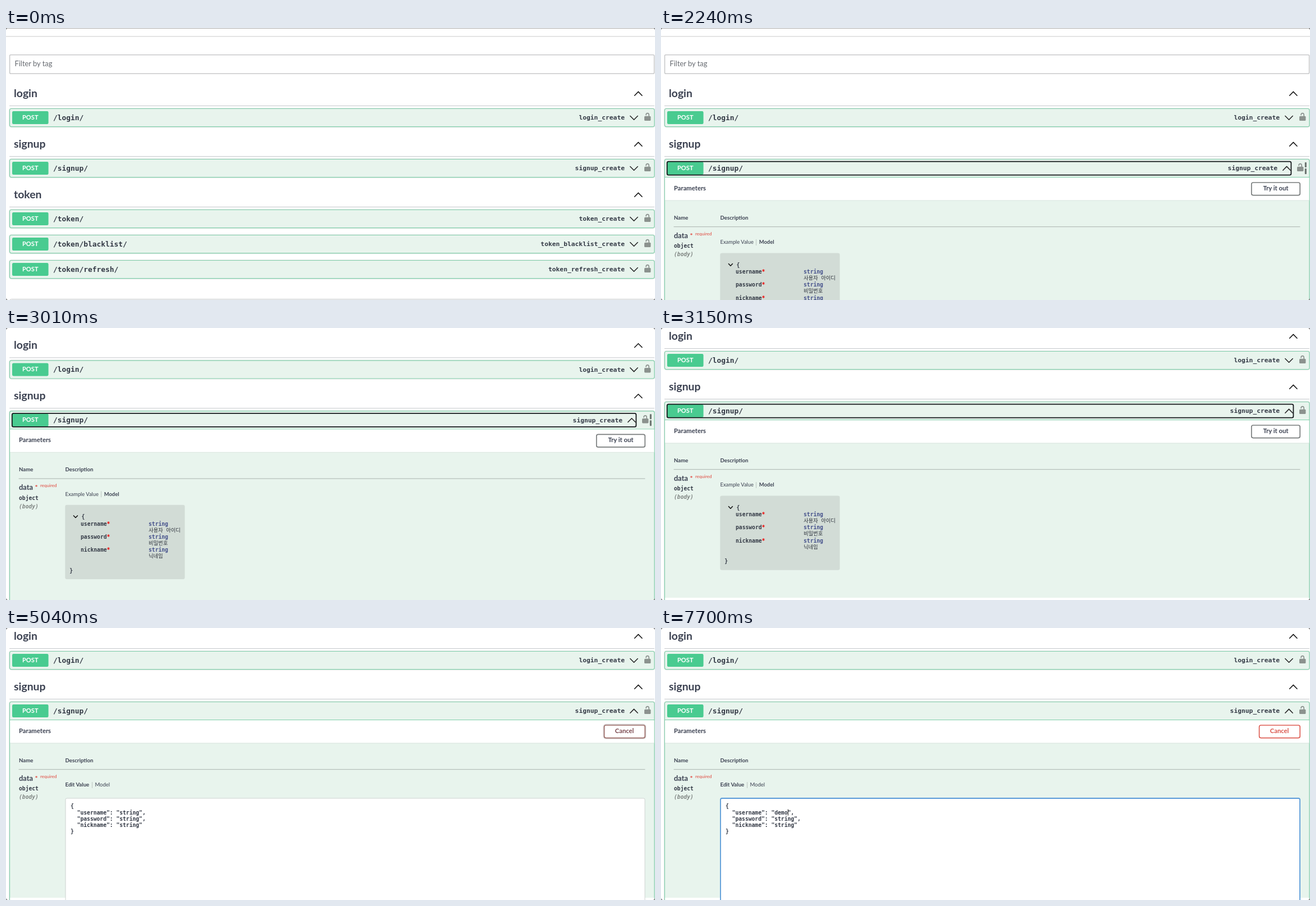
An HTML page that plays this animation: 1156 px wide and 484 px high, repeating every 8 s.

```html
<!DOCTYPE html>
<html lang="en">
<head>
<meta charset="utf-8">
<title>API console</title>
<style>
  html, body { margin: 0; width: 100%; height: 100%; overflow: hidden; background: #fff; }
  svg { display: block; width: 1156px; height: 484px; }
  text { font-family: Lato, sans-serif; fill: #3b4151; white-space: pre; }
  .b { font-weight: 700; }
  .m { font-family: "DejaVu Sans Mono", monospace; font-weight: 700; fill: #333945; }
  .k { font-family: "DejaVu Sans Mono", "Noto Sans CJK KR", "Noto Sans CJK JP", monospace; fill: #2c313b; }
  .red { fill: #e0483e; }
</style>
</head>
<body>
<svg id="stage" viewBox="0 0 1156 484"></svg>
<script>
const LOOP = 8000, STEP = 70, SCROLL = 102, BODY = 640;
const CHAR = 5.821, EDIT_X = 115, WORD_COL = 15;
const GREEN = '#49cb90', TINT = '#e8f4ed', EDGE = '#82cfac';
const stage = document.getElementById('stage');

function el(parent, tag, attrs = {}) {
  const node = document.createElementNS('http://www.w3.org/2000/svg', tag);
  for (const k in attrs) node.setAttribute(k, attrs[k]);
  return parent.appendChild(node);
}
const group = (p, attrs) => el(p, 'g', attrs);
const rect = (p, x, y, width, height, attrs) => el(p, 'rect', { x, y, width, height, ...attrs });
const line = (p, d, stroke, w = 1) =>
  el(p, 'path', { d, stroke, 'stroke-width': w, fill: 'none', 'stroke-linecap': 'round', 'stroke-linejoin': 'round' });
function text(p, x, y, size, str, cls = '', attrs = {}) {
  const node = el(p, 'text', { x, y, 'font-size': size, class: cls, ...attrs });
  node.textContent = str;
  return node;
}
const show = (node, on) => node.setAttribute('display', on ? 'inline' : 'none');
const shift = (node, x, y) => node.setAttribute('transform', `translate(${x} ${y})`);
const clamp = u => Math.max(0, Math.min(1, u));
const phase = (t, from, to) => clamp((t - from) / (to - from));

const chevron = (x, y, dy) => `M${x} ${y}l6.7 ${dy}l6.7 ${-dy}`;

function tag(p, base, name) {
  text(p, 14, base, 19.4, name, 'b');
  line(p, chevron(1119.6, base - 2.8, -6.8), '#111', 1.5);
  line(p, `M6.5 ${base + 15.5}H1154.5`, '#c6c8cc');
}

function lock(p, x, y) {
  rect(p, x, y + 5.8, 11.4, 8.4, { rx: 1.6, fill: '#8b928e' });
  line(p, `M${x + 8.2} ${y + 6}v-2.3c0-4-5-4-5.2 0`, '#8b928e', 1.6);
}

// One operation row; returns the parts that change later.
function operation(p, y, path, id) {
  const box = { rx: 3.2, fill: 'none' };
  const halo = rect(p, 6.5, y, 1148.5, 32.2, { ...box, stroke: 'rgba(0,0,0,.08)', 'stroke-width': 3.2 });
  const frame = rect(p, 6.5, y, 1148.5, 32.2, { ...box, fill: TINT, stroke: EDGE, 'stroke-width': 1.2 });
  rect(p, 11, y + 4.6, 64.6, 23, { rx: 2.4, fill: GREEN });
  text(p, 43.3, y + 19.2, 11.1, 'POST', 'b', { 'text-anchor': 'middle', style: 'fill:#fff' });
  text(p, 84, y + 20.3, 12.88, path, 'm');
  const tail = group(p);
  text(tail, 1102, y + 19.8, 11.3, id, 'm', { 'text-anchor': 'end' });
  const arrow = line(tail, chevron(1111.8, y + 13, 6.8), '#222', 1.5);
  lock(tail, 1137, y + 7.4);
  return { halo, frame, tail, arrow };
}

const page = group(stage);
rect(page, 0.5, -40, 1155, 40.4, { rx: 3, fill: '#fff', stroke: '#a3a3a3' });
rect(page, 0, 14, 1156, 2, { fill: '#e4e4e4' });
rect(page, 6.6, 47.8, 1148, 33.4, { rx: 2, fill: '#fff', stroke: '#c9cacb', 'stroke-width': 1.6 });
text(page, 15.5, 67.6, 12.9, 'Filter by tag', '', { style: 'fill:#666a70' });

tag(page, 123, 'login');
operation(page, 143.5, '/login/', 'login_create');
tag(page, 213, 'signup');

const below = group(page);
tag(below, 303, 'token');
operation(below, 323.5, '/token/', 'token_create');
operation(below, 368.5, '/token/blacklist/', 'token_blacklist_create');
operation(below, 413.5, '/token/refresh/', 'token_refresh_create');
rect(below, 6.5, 482.6, 1148.5, 60, { rx: 3, fill: '#fff', stroke: '#c2c4c7' });

const signup = operation(page, 233.5, '/signup/', 'signup_create');
const bars = group(page);
rect(bars, 1146.8, 239, 3, 9, { rx: 0.8, fill: '#68706c' });
rect(bars, 1146.8, 250, 3, 10, { rx: 0.8, fill: '#68706c' });
const outline = rect(page, 10.8, 237.6, 1112, 24, { rx: 2.6, fill: 'none', stroke: '#14181b', 'stroke-width': 1.8 });

const clip = el(el(stage, 'defs'), 'clipPath', { id: 'fold' });
const fold = rect(clip, 0, 265, 1156, 0);
const body = group(page, { 'clip-path': 'url(#fold)' });
line(body, 'M7 265.5H1154.5', EDGE, 1.2);
rect(body, 7.2, 266.2, 1147.2, 40.3, { fill: '#fff' });
line(body, 'M7.5 307H1154', '#dce6e0');
text(body, 23, 289, 11.28, 'Parameters', 'b');
text(body, 23, 340.6, 9.67, 'Name', 'b');
text(body, 105.5, 340.6, 9.67, 'Description', 'b');
line(body, 'M23 353.7H1138', '#a9b3ae');
text(body, 23, 373.6, 12.9, 'data', 'b');
text(body, 51.6, 374, 12, '*', 'b red');
text(body, 61, 369, 8.1, 'required', 'red');
text(body, 23, 391.2, 9.67, 'object', 'm');
text(body, 23, 406.4, 9.67, '(body)', 'm', { style: 'font-style:italic;fill:#808683' });
rect(body, 7.2, 582, 1147.2, 40, { fill: '#fff' });

const glow = rect(body, 1051.4, 274.8, 87, 22.8, { rx: 3.4, fill: 'none', stroke: 'rgba(0,0,0,.16)', 'stroke-width': 4.4 });
const button = rect(body, 1051.8, 275, 86.4, 22.6, { rx: 3, fill: '#fff', 'stroke-width': 1.7 });
const label = text(body, 1095, 289, 11.28, '', 'b', { 'text-anchor': 'middle' });

// Read-only model
const model = group(body);
text(model, 105.5, 384.2, 9.35, 'Example Value');
line(model, 'M169.5 376.5V386.5', '#bcc5c0');
text(model, 174.8, 384.2, 9.35, 'Model', 'b');
rect(model, 105.3, 400.5, 213.2, 132.2, { rx: 3.2, fill: '#d2dcd6' });
line(model, 'M120.4 419.6l3.5 3.6l3.5 -3.6', '#111', 1.5);
text(model, 134.5, 424.6, 9.67, '{', 'm');
[['username', '사용자 아이디'], ['password', '비밀번호'], ['nickname', '닉네임']].forEach(([key, note], i) => {
  const y = 437.3 + i * 23.1;
  text(model, 133, y, 9.67, key, 'm');
  text(model, 133 + 8 * CHAR, y, 9.67, '*', 'm', { style: 'fill:#e00' });
  text(model, 254, y, 9.67, 'string', 'm', { style: 'fill:#46528c' });
  text(model, 254, y + 11, 9.3, note, 'k');
});
text(model, 113.3, 520.4, 9.67, '}', 'm');

// Editable value
const editor = group(body);
text(editor, 105.5, 384.2, 9.67, 'Edit Value', 'b');
line(editor, 'M153.5 376.5V386.5', '#bcc5c0');
text(editor, 158.4, 384.2, 9.5, 'Model');
const area = rect(editor, 106, 405, 1032, 260, { rx: 2.6, fill: '#fff' });
const select = rect(editor, EDIT_X + WORD_COL * CHAR, 424.3, 6 * CHAR, 11.4, { fill: '#b4d5fe' });
const rows = ['{', '', '  "password": "string",', '  "nickname": "string"', '}'].map((s, i) =>
  text(editor, EDIT_X, 422.4 + i * 11.27, 9.67, s, 'm'));
const caret = rect(editor, 0, 424.6, 1, 11, { fill: '#111' });

// Window corners stay put while the page scrolls.
el(stage, 'path', { d: 'M0 0h3l-3 3zM1156 0v3l-3 -3zM0 484v-3l3 3zM1156 484h-3l3 -3z', fill: '#8c8c8c' });

const typed = [[0, 'string'], [7350, 'd'], [7490, 'de'], [7560, 'dem'], [7700, 'demo']];

function blend(a, b, u) {
  return `rgb(${a.map((v, i) => Math.round(v + (b[i] - v) * u))})`;
}

function draw(t) {
  const scroll = 1 - (1 - phase(t, 2800, 3150)) ** 2;
  shift(page, 0, -SCROLL * scroll);

  const hover = t >= 1960 && t < 3080;
  shift(signup.tail, hover ? -4 : 0, 0);
  show(bars, hover);

  const open = t >= 2100;
  const height = BODY * (1 - (1 - phase(t, 2030, 2450)) ** 3) * open;
  for (const r of [signup.halo, signup.frame]) r.setAttribute('height', 32.2 + height);
  fold.setAttribute('height', height);
  show(body, open);
  shift(below, 0, height);
  signup.arrow.setAttribute('d', open ? chevron(1111.8, 253.2, -6.8) : chevron(1111.8, 246.5, 6.8));
  show(outline, open && t < 4830);
  outline.setAttribute('width', hover ? 1111.6 : 1115.6);

  const editing = t >= 4970;
  const u = phase(t, 4900, 5250);
  show(model, !editing);
  show(editor, editing);
  const x = editing ? 1065.6 : 1051.8;
  button.setAttribute('x', x);
  button.setAttribute('width', 1138.2 - x);
  glow.setAttribute('x', x);
  glow.setAttribute('width', 1138.2 - x);
  show(glow, t >= 3640 && t < 5390);
  button.setAttribute('stroke', blend([120, 124, 124], [221, 95, 85], u));
  label.style.fill = blend([59, 65, 81], [218, 86, 76], u);
  label.textContent = editing ? 'Cancel' : 'Try it out';
  label.setAttribute('x', editing ? 1101.6 : 1095);

  const focused = t >= 6090, selected = t >= 6370 && t < 7350;
  area.setAttribute('stroke', focused ? '#5a9bd8' : '#cdd3d0');
  area.setAttribute('stroke-width', focused ? 1.8 : 1);
  const word = typed.filter(([at]) => at <= t).pop()[1];
  rows[1].textContent = `  "username": "${word}",`;
  show(select, selected);
  show(caret, focused && !selected);
  caret.setAttribute('x', EDIT_X + (WORD_COL + Math.min(4, word.length)) * CHAR + 0.2);
}

function tick() {
  const t = performance.now() % LOOP;
  draw(Math.floor(t / STEP) * STEP);
  requestAnimationFrame(tick);
}
tick();
</script>
</body>
</html>
```
